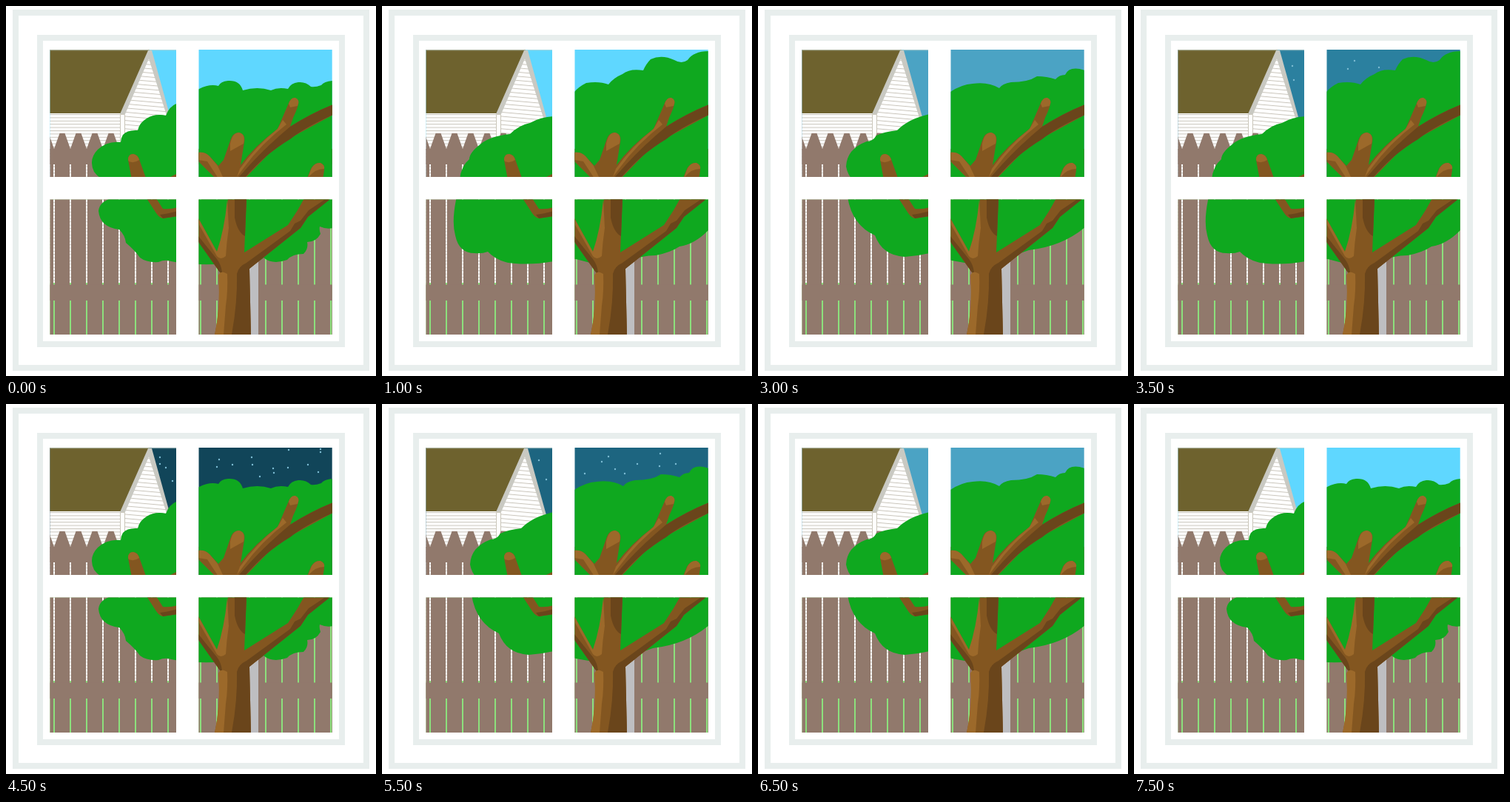
These frames come from a looping animation (500 px wide and 500 px high, 8000 ms). An HTML page without scripts:

```html
<!DOCTYPE html>
<html lang="en">
<head>
<meta charset="utf-8">
<title>Tree outside a window</title>
<style>
html, body { margin: 0; width: 100%; height: 100%; overflow: hidden; background: #fff; }
svg { display: block; width: 100vw; height: 100vh; }
.sky, .leaf, .stars { animation: 8s step-end infinite; }
.leaf { fill: #0fa81f; }
.stars { fill: none; stroke: #79b9d0; stroke-width: 2.4; stroke-linecap: round; visibility: hidden; }
.mid { fill: #835620; }
.dark { fill: #6a451b; }
.light { fill: #9c692a; }
.trim { fill: #c9c9c2; }

/* sixteen half-second steps: 6.25% each */
.sky { fill: #5fd7ff; animation-name: sky; }
@keyframes sky {
  0%, 93.75% { fill: #5fd7ff; }
  31.25%, 87.5% { fill: #55bde2; }
  37.5%, 81.25% { fill: #4ba3c4; }
  43.75%, 75% { fill: #2b809f; }
  50%, 68.75% { fill: #1d6580; }
  56.25% { fill: #114559; }
}
.rest { animation-name: rest; }
@keyframes rest {
  0%, 25%, 56.25%, 87.5% { visibility: visible; }
  6.25%, 37.5%, 68.75% { visibility: hidden; }
}
.sway { animation-name: sway; }
@keyframes sway {
  0%, 12.5%, 25%, 43.75%, 56.25%, 75%, 87.5% { visibility: hidden; }
  6.25%, 18.75%, 37.5%, 50%, 68.75%, 81.25% { visibility: visible; }
}
.gust { animation-name: gust; }
@keyframes gust {
  0%, 18.75%, 50%, 81.25% { visibility: hidden; }
  12.5%, 43.75%, 75% { visibility: visible; }
}
.few { animation-name: few; }
@keyframes few {
  0%, 50%, 81.25% { visibility: hidden; }
  43.75%, 75% { visibility: visible; }
}
.some { animation-name: some; }
@keyframes some {
  0%, 56.25%, 75% { visibility: hidden; }
  50%, 68.75% { visibility: visible; }
}
.many { animation-name: many; }
@keyframes many {
  0%, 68.75% { visibility: hidden; }
  56.25% { visibility: visible; }
}
</style>
</head>
<body>
<svg viewBox="0 0 500 500">
<defs>
  <clipPath id="panes">
    <path d="M59.5 59H230V231H59.5zM260.5 59H440.7V231H260.5zM59.5 261.5H230V444H59.5zM260.5 261.5H440.7V444H260.5z"/>
  </clipPath>
  <pattern id="siding" width="8" height="4.4" y="146" patternUnits="userSpaceOnUse">
    <path fill="#fff" d="M0 0H8V5H0z"/><path fill="#ccc8bf" d="M0 0H8V1.1H0z"/>
  </pattern>
  <pattern id="gable" width="8" height="5.6" patternUnits="userSpaceOnUse" patternTransform="skewY(5)">
    <path fill="#fff" d="M0 0H8V6H0z"/><path fill="#ccc8bf" d="M0 0H8V1.1H0z"/>
  </pattern>
  <pattern id="pickets" x="66" width="22" height="300" patternUnits="userSpaceOnUse">
    <path fill="#91796c" d="M0 0H20V300H0z"/>
  </pattern>
  <pattern id="points" x="65" y="172" width="22" height="22" patternUnits="userSpaceOnUse">
    <path fill="#91796c" d="M0 22V21L7.5 0H14.5L22 21V22z"/>
  </pattern>
</defs>

<rect x="13" y="9" width="474" height="480" fill="none" stroke="#e8eeed" stroke-width="8"/>
<rect x="46" y="43" width="408" height="414" fill="none" stroke="#e8eeed" stroke-width="8"/>

<g clip-path="url(#panes)">
  <path class="sky" d="M59 59H441V240H59z"/>
  <path class="stars few" d="M214 81h0M216 100h0M298 74h0M289 85h0M331 83h0"/>
  <path class="stars some" d="M212 76h0M222 102h0M274 94h0M297 78h0M306 71h0M315 88h0M328 94h0M345 81h0M376 67h0M375 84h0M397 81h0"/>
  <path class="stars many" d="M208 72h0M208 81h0M216 86h0M225 104h0M288 75h0M285 85h0M306 82h0M332 72h0M333 82h0M343 98h0M361 87h0M362 93h0M382 62h0M381 86h0M408 82h0M422 92h0M425 61h0M425 65h0"/>

  <!-- house -->
  <path fill="#8ce07c" d="M59 240H441V444H59z"/>
  <path fill="url(#siding)" d="M59 145H158V200H221V374H59z"/>
  <path fill="url(#gable)" d="M194 64L219 150L221 200H158V146z"/>
  <path fill="#6e622e" d="M59 59H194L155 145H59z"/>
  <path class="trim" d="M192 60H196L194 69L161 146H154zM193 60H197L222 150L218 151L192 68z"/>
  <path fill="#fff" stroke="#c9c5b8" d="M154.5 146.5H160.5V195H154.5z"/>
  <path fill="#c4d6d0" opacity=".6" d="M59 59H230V60.3H59z"/>

  <!-- fence -->
  <path fill="url(#points)" d="M59 172H231V194H59z"/>
  <path fill="url(#pickets)" d="M59 193H441V444H59z"/>
  <path fill="#91796c" d="M59 193H441V214H59zM59 376.5H441V398H59z"/>
  <path fill="#bebec1" d="M326 335H341V444H326z"/>

  <!-- foliage -->
  <path class="leaf rest" d="M232 131Q220 136 216 148Q201 145 190 152Q180 158 178 168Q164 167 158 174Q155 179 155 184Q137 182 124 194Q111 207 119 224Q126 234 140 238L142 260Q126 265 125 277Q127 299 153 302Q161 310 162 320Q174 330 181 340Q190 347 206 346Q215 342 223 345Q245 350 283 349L335 345Q344 345 348 340Q360 350 380 343Q387 335 402 335Q409 328 407 319Q419 319 425 308Q423 302 424 298Q433 302 442 300V101Q430 102 426 107Q418 110 412 109Q405 102 395 103Q385 104 381 112Q368 109 358 114Q340 108 320 114Q316 100 300 101Q290 102 287 108Q275 105 261 112L240 125z"/>
  <path class="leaf sway" d="M232 146Q204 152 188 168Q170 170 160 175Q155 183 147 183Q120 193 119 217Q121 228 128 235L121 258Q127 296 158 310Q168 337 198 339Q215 338 232 334L262 344L285 348L335 345Q350 335 366 330Q411 325 442 299V87Q421 80 415 93Q407 93 402 99Q390 95 377 95Q365 103 342 103Q330 105 326 111Q311 102 290 105Q275 106 260 116z"/>
  <path class="leaf gust" d="M232 149Q214 150 200 158Q185 161 173 173Q146 176 134 186Q118 198 118 207Q107 216 105 234L100 262Q94 292 99 310Q104 334 125 334Q135 335 143 332Q158 347 180 348Q205 350 232 345L262 342L285 348L335 345Q350 337 370 337Q390 333 402 325Q423 322 442 302V61Q421 61 413 73Q405 79 395 73Q378 65 363 72Q357 78 353 87Q335 84 325 92Q313 97 306 106Q293 101 276 104Q266 109 260 116z"/>

  <!-- left boughs -->
  <path class="mid" d="M165 208Q165 200 172 200Q179 201 181 210L190 235H170zM190 260H203L212 274Q222 275 232 272V284L212 287Q207 286 203 280zM220 232L230 227V232z"/>
  <path class="light" d="M165 208Q165 200 172 200Q178 201 180 208Q173 213 166 210z"/>
  <path class="dark" d="M208 282Q218 281 232 277V284L212 287z"/>

  <!-- upper boughs -->
  <path class="mid" d="M260 198Q269 197 275 203L287 216L294 208L303 182Q306 171 315 171Q324 173 322 184L317 215Q335 190 367 166L383 129Q388 121 395 128Q397 132 388 151L384 163Q412 145 442 133V147L385 178L355 200L323 233H283L260 210z"/>
  <path class="dark" d="M313 233L330 214Q355 187 384 163Q412 145 442 133V147Q405 163 384 180Q350 200 322 233z"/>
  <path class="light" d="M303 186Q306 171 315 171Q324 173 321 186L303 196zM260 198Q269 197 275 203L286 216L294 233H287L272 210L260 208zM382 132Q385 123 391 124Q398 127 394 135L384 137zM316 220Q338 189 367 166L374 154L379 160Q345 186 321 219L312 231z"/>
  <path class="mid" d="M406 235L412 220Q417 211 425 212Q431 214 430 222L428 235z"/>
  <path class="light" d="M409 229L413 219Q418 211 425 212Q431 215 430 220Q418 220 409 231z"/>

  <!-- trunk and lower boughs -->
  <path class="mid" d="M282 444Q290 408 289 360L260 318V287L285 332Q296 303 300 260H325L322 333L381 296L394 276L403 260H438L408 285L398 300L329 355L331 444z"/>
  <path class="light" d="M260 287L285 332Q295 303 299 262L301 300Q298 320 297 338Q290 344 285 338L260 294zM282 444Q290 408 287 364Q290 356 299 362Q300 385 297 405L294 444z"/>
  <path class="dark" d="M309 260H325L323 311Q313 306 309 286zM260 311L285 342Q291 350 292 360H289L260 319zM305 444Q313 400 312 362Q314 352 325 347L384 304L390 294L398 290L409 276L430 262H437L408 285L398 300L329 355L331 444z"/>
</g>
</svg>
</body>
</html>
```
